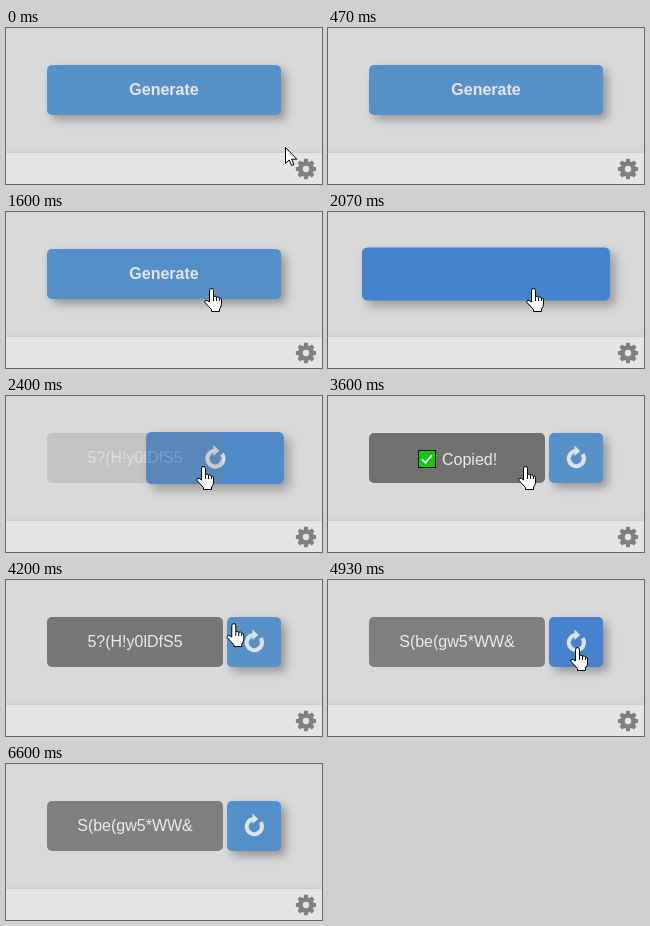
Animation of 316x156 px, one loop 7.07 s. Source, as an HTML page:

```html
<!DOCTYPE html>
<html lang="en">
<head>
<meta charset="utf-8">
<title>Password generator</title>
<style>
html, body { margin: 0; width: 100%; height: 100%; overflow: hidden; }
body { position: relative; background: #d9d9d9; font: 16px/50px Arial, "Liberation Sans", sans-serif; color: #e6e6e6; }
body * { position: absolute; }
svg { overflow: visible; }
svg * { position: static; }
#footer { left: 0; top: 125px; width: 316px; height: 31px; background: #e5e5e5; box-shadow: 0 -1px 3px rgba(0,0,0,.08); }
#gear { left: 300px; top: 141px; width: 1px; height: 1px; fill: #808080; }
#button, #field { top: 37px; height: 50px; border-radius: 5px; }
#button { box-shadow: 5px 5px 10px rgba(0,0,0,.3); }
#label, .line { left: 0; width: 100%; text-align: center; white-space: nowrap; }
#label { font-weight: bold; }
#icon { left: 50%; top: 24px; width: 1px; height: 1px; }
#field { left: 41px; width: 176px; color: #ebebeb; }
#copied span { left: 73px; top: 2px; }
#copied svg { left: 49px; top: 17px; }
#cursor { left: 0; top: 0; }
#cursor svg { left: 0; top: 0; fill: #fff; stroke: #000; stroke-linejoin: round; }
#cursor #hand { left: -7px; }
</style>
</head>
<body>
<div id="footer"></div>
<svg id="gear"><path id="cog" fill-rule="evenodd"/></svg>
<div id="button">
  <div id="label">Generate</div>
  <svg id="icon">
    <path d="M6.6 -3.8A7.6 7.6 0 1 1 -.5 -7" transform="translate(0 1)" fill="none" stroke="#dde3ea" stroke-width="4"/>
    <path d="M-1.5 -11.5L4.2 -6L-1.5 -1Z" fill="#dde3ea"/>
  </svg>
</div>
<div id="field">
  <div class="line" id="password"></div>
  <div class="line" id="copied">
    <svg width="18" height="18">
      <rect x=".5" y=".5" width="17" height="17" fill="#16c60c" stroke="#111"/>
      <path d="M4 9.3L7.3 12.6L14 5.4" fill="none" stroke="#fff" stroke-width="1.8"/>
    </svg>
    <span>Copied!</span>
  </div>
</div>
<div id="cursor">
  <svg id="arrow" width="13" height="20"><path d="M.5 .5V16.5L4.2 13L6.6 18.5L9 17.5L6.6 12.2H11.8Z"/></svg>
  <svg id="hand" width="19" height="25">
    <path d="M5.5 14V2.5a2 2 0 0 1 4 0V8.5q1.8-1 3 .6q1.9-.7 2.9.9q2.1-.2 2.1 2V16q0 3-2 5V23.5H7.5V21.5L1 14.6q-.8-2 1-2.4q1.6 0 3.5 1.8Z"/>
    <path d="M9.5 8.5V13M12.5 9.2V13M15.4 10.2V13" fill="none"/>
  </svg>
</div>
<script>
const LOOP = 7070;
const START = { x: 279, y: 119 };
const MOVES = [
  { from: 70, to: 330, x: 299, y: 158 },
  { from: 1380, to: 1590, x: 205, y: 76 },
  { from: 2070, to: 2390, x: 197, y: 70 },
  { from: 4040, to: 4330, x: 249, y: 67, lift: 26 },
  { from: 6230, to: 6590, x: 197, y: 158 }
];

const $ = id => document.getElementById(id);
const mix = (a, b, k) => a + (b - a) * k;
const ramp = (t, a, b) => Math.min(1, Math.max(0, (t - a) / (b - a)));
const ease = (t, a, b) => {
  const k = ramp(t, a, b);
  return k * k * (3 - 2 * k);
};
const between = (t, a, b) => t >= a && t < b;
const show = (id, on) => { $(id).style.visibility = on ? "visible" : "hidden"; };

function gearPath(teeth) {
  const step = 2 * Math.PI / teeth;
  const point = (r, a) => `${r * Math.sin(a)} ${-r * Math.cos(a)}`;
  let d = "";
  for (let i = 0; i < teeth; i++) {
    for (const [r, a] of [[7.9, -.35], [10.3, -.23], [10.3, .23], [7.9, .35]]) {
      d += (d ? "L" : "M") + point(r, (i + a) * step);
    }
  }
  return d + "ZM-3.2 0a3.2 3.2 0 1 0 6.4 0a3.2 3.2 0 1 0 -6.4 0Z";
}

function cursorAt(t) {
  let { x, y } = START;
  for (const m of MOVES) {
    const k = ease(t, m.from, m.to);
    x = mix(x, m.x, k);
    y = mix(y, m.y, k) - (m.lift || 0) * Math.sin(Math.PI * k);
  }
  return { x, y };
}

function drawButton(t) {
  const width = mix(234, 54, ease(t, 2200, 2570));
  const hover = ramp(t, 1560, 1850) - ramp(t, 2300, 2500) + ramp(t, 4200, 4450) - ramp(t, 6300, 6650);
  const grow = ease(t, 1580, 2000) - ease(t, 2130, 2900);
  Object.assign($("button").style, {
    left: 275 - width + "px",
    width: width + "px",
    transform: `scale(${1 + .06 * grow})`,
    background: `rgb(${mix(88, 70, hover)}, ${mix(145, 130, hover)}, ${mix(200, 205, hover)})`
  });
  $("label").style.opacity = 1 - ramp(t, 1600, 2000);
  $("icon").style.opacity = ease(t, 2100, 2350);
}

function drawField(t) {
  const gray = mix(128, 112, ramp(t, 2600, 2800) - ramp(t, 4100, 4330));
  const copied = between(t, 3470, 4070);
  $("field").style.opacity = ease(t, 2270, 2700);
  $("field").style.background = `rgb(${gray}, ${gray}, ${gray})`;
  $("password").textContent = t < 4930 ? "5?(H!y0lDfS5" : "S(be(gw5*WW&";
  show("password", !copied);
  show("copied", copied);
}

function drawCursor(t) {
  const { x, y } = cursorAt(t);
  const over = between(x, 41, 275) && between(y, 37, 87);
  $("cursor").style.transform = `translate(${x}px, ${y}px)`;
  show("hand", over);
  show("arrow", !over);
}

function draw(now) {
  const t = now % LOOP;
  drawButton(t);
  drawField(t);
  drawCursor(t);
}

$("cog").setAttribute("d", gearPath(8));
const begin = performance.now();
function tick(now) {
  draw(Math.max(0, now - begin));
  requestAnimationFrame(tick);
}
draw(0);
requestAnimationFrame(tick);
</script>
</body>
</html>
```
